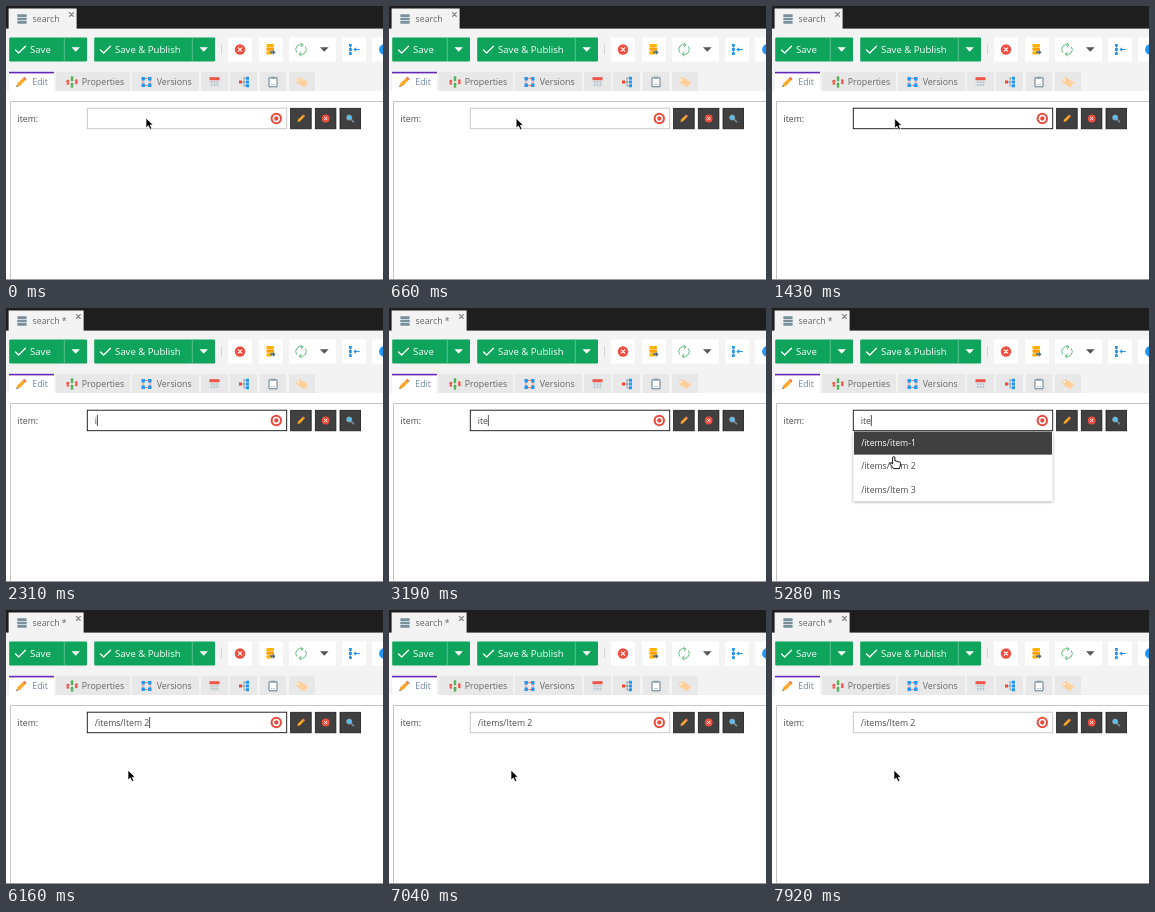
Animation, 377 px wide and 274 px high, one loop 8 s. Source, as an HTML page:

```html
<!DOCTYPE html>
<html lang="en">
<head>
<meta charset="utf-8">
<title>Item search</title>
<style>
html, body { margin: 0; width: 100%; height: 100%; overflow: hidden; background: #fff; }
svg { display: block; width: 377px; height: 274px; }
text { font: 8.7px "Open Sans", sans-serif; fill: #4a4a4a; white-space: pre; }
text.btn { font-size: 9.6px; fill: #fff; }
text.tab { font-size: 8.8px; fill: #666; }
text.tab.on { fill: #6f87a6; }
.line { fill: none; stroke-linecap: round; stroke-linejoin: round; }
</style>
</head>
<body>
<svg id="stage" viewBox="0 0 377 274">
  <defs>
    <filter id="shadow" x="-10%" y="-10%" width="120%" height="130%">
      <feDropShadow dx="0" dy="1" stdDeviation="1.6" flood-color="#000" flood-opacity=".4"/>
    </filter>
    <g id="pencil">
      <path d="M-5 5l1.2-3.8L3-5.2 5.2-3-1.2 3.8z" fill="#ffa726"/>
      <path d="M1.8-4L3-5.2 5.2-3 4-1.8z" fill="#e57373"/>
      <path d="M-5 5l.5-1.7 1.2 1.2z" fill="#455a64"/>
    </g>
    <g id="cancel">
      <circle r="5.2" fill="#ee4f40"/>
      <path class="line" d="M-1.7-1.7L1.7 1.7M1.7-1.7L-1.7 1.7" stroke="#fff" stroke-width="1.2"/>
    </g>
    <g id="tree">
      <path class="line" d="M-2 0H2M0-4V4H2M0-4H2" stroke="#78909c" stroke-width=".8"/>
      <path d="M-5-1.5h3v3h-3z" fill="#f44336"/>
      <path d="M2-5.3h3v3H2zM2-1.5h3v3H2zM2 2.3h3v3H2z" fill="#2196f3"/>
    </g>
  </defs>

  <rect width="377" height="274" fill="#fff"/>
  <rect width="377" height="23" fill="#1e1e1e"/>
  <rect y="22.6" width="377" height="62.4" fill="#f3f3f3"/>
  <rect id="tab" x="2.6" y="2.5" height="21" fill="#f3f3f3"/>
  <g fill="#78909c">
    <rect x="11.3" y="8.3" width="9.4" height="2.6" rx=".6"/>
    <rect x="11.3" y="11.7" width="9.4" height="2.6" rx=".6"/>
    <rect x="11.3" y="15.1" width="9.4" height="2.6" rx=".6"/>
  </g>
  <text id="title" class="tab" x="26.5" y="16.3"></text>
  <path id="close" class="line" d="M-2-2L2 2M2-2L-2 2" stroke="#888" stroke-width="1.1"/>

  <g id="buttons"></g>
  <path d="M215.5 38.5v10" stroke="#ccc" stroke-width=".8"/>
  <g fill="#fff">
    <rect x="222" y="31.4" width="24" height="24.2"/><rect x="253" y="31.4" width="24" height="24.2"/>
    <rect x="283" y="31.4" width="47" height="24.2"/><rect x="336" y="31.4" width="24" height="24.2"/>
    <rect x="366" y="31.4" width="11" height="24.2"/>
  </g>
  <use href="#cancel" x="234" y="43.5"/>
  <g transform="translate(264.6 43.3)">
    <rect x="-4.2" y="-5.3" width="7.6" height="3.2" rx="1" fill="#ffb300"/>
    <rect x="-4.2" y="-1.7" width="7.6" height="3.2" rx="1" fill="#ffa000"/>
    <rect x="-4.2" y="1.9" width="5.6" height="3.2" rx="1" fill="#ffb300"/>
    <path d="M-.4 2h2.6V.4L5 3 2.2 5.6V4H-.4z" fill="#546e7a"/>
  </g>
  <g class="line" stroke="#5fbf77" stroke-width="1">
    <path d="M290.5 46.2A5 5 0 0 1 296.5 38.8M299.5 40.8A5 5 0 0 1 293.5 48.2"/>
    <path d="M294.9 37.2l2 1.6-1.6 2M295.1 46.2l-1.8 2 2 1.7"/>
  </g>
  <path d="M314 41.2h8.6l-4.3 4.6z" fill="#555"/>
  <path d="M344.5 38.5v10" stroke="#78909c" stroke-width=".8"/>
  <path d="M343 37.9h2.8v2.8H343zM343 42.1h2.8v2.8H343zM343 46.3h2.8v2.8H343z" fill="#2196f3"/>
  <path d="M347.3 43.5l2.8-2.2v1.6h3.6v1.2h-3.6v1.6z" fill="#2196f3"/>
  <circle cx="378.4" cy="43.5" r="5.3" fill="#2196f3"/>

  <g id="tabs"></g>
  <use href="#pencil" x="15.3" y="76"/>
  <g id="people"></g>
  <g transform="translate(140.5 76)">
    <path d="M-3.5-3.5h7v7h-7z" fill="none" stroke="#ef6c60" stroke-width=".8"/>
    <path d="M-5-5h3.4v3.4H-5zM1.6-5H5v3.4H1.6zM-5 1.6h3.4V5H-5zM1.6 1.6H5V5H1.6z" fill="#2196f3"/>
  </g>
  <g transform="translate(208.5 76)">
    <path d="M-5-4.6H5V5H-5z" fill="#dde3e6"/>
    <path d="M-5-4.8H5v3H-5z" fill="#ee5548"/>
    <path d="M-3.5 .2H3.6M-3.5 2.8H3.6" stroke="#a3b1b8" stroke-width="1.2" stroke-dasharray="1.4 1.4"/>
  </g>
  <use href="#tree" x="238" y="76"/>
  <g transform="translate(267 76)">
    <path d="M-4-4.2h8v9h-8z" fill="#fff" stroke="#607d8b"/>
    <path d="M-2-5.4h4v2.2h-4z" fill="#90a4ae"/>
    <path d="M-1.8 2.6H2" stroke="#90a4ae" stroke-dasharray="1.2 1.2"/>
  </g>
  <g transform="translate(296 76)">
    <path d="M-6-2.8L-2.2-4.8 6 .3 2.3 5.2-5 1z" fill="#ffd09b"/>
    <circle cx="-3.8" cy="-2" r=".9" fill="#fff"/>
  </g>

  <path d="M4.5 274V95.5H377" fill="none" stroke="#c4c4c4"/>
  <path d="M0 273.5H377" stroke="#9a9a9a"/>
  <text x="11.5" y="116.2">item:</text>

  <rect id="field" x="81.3" y="102.2" width="199.4" height="20.5" fill="#fff"/>
  <text id="value" x="88.8" y="116.2"></text>
  <path id="caret" d="M0 107v11" stroke="#222" stroke-width=".8"/>
  <circle cx="270.3" cy="112.5" r="5.7" fill="#ea4b3c"/>
  <circle cx="270.3" cy="112.5" r="2.9" fill="none" stroke="#fff" stroke-width="1.5"/>
  <g fill="#404040" stroke="#1c1c1c" stroke-width=".8">
    <rect x="284.6" y="102.3" width="20.6" height="20.5"/>
    <rect x="309.3" y="102.3" width="20.6" height="20.5"/>
    <rect x="334" y="102.3" width="20.6" height="20.5"/>
  </g>
  <use href="#pencil" transform="translate(295 112.5) scale(.75)"/>
  <use href="#cancel" transform="translate(319.7 112.5) scale(.75)"/>
  <g transform="translate(344 112.3)">
    <path d="M1 1L4 4" stroke="#78909c" stroke-width="1.6"/>
    <circle cx="-.8" cy="-.8" r="2.5" fill="#4fc3f7" stroke="#90a4ae"/>
  </g>

  <g id="loading">
    <rect x="81.5" y="124" width="199.5" height="45" fill="#f6f6f6" filter="url(#shadow)"/>
    <rect x="154.5" y="125" width="52.3" height="42" fill="#d0d0d0"/>
    <g id="spinner"></g>
    <text x="161.4" y="157.5">Loading...</text>
  </g>
  <g id="list">
    <rect x="81.5" y="123.5" width="199" height="69.5" fill="#fff" filter="url(#shadow)"/>
  </g>

  <path id="arrow" d="M0 0V9.8L2.3 7.7 4 11.4 5.8 10.6 4.2 7H7.2z" fill="#000" stroke="#fff" stroke-width=".7"/>
  <path id="hand" d="M-1.2 .2Q0-1 1.1 .2V4Q2.2 3.3 3 4.4 4.3 3.8 5 5 6.8 4.7 6.8 6.3 6.8 9 5.5 11.6H-.3Q-1.6 9.3-3.9 7.2-4.2 5.5-2.6 5.8L-1.2 7z" fill="#fff" stroke="#000" stroke-width=".9"/>
</svg>
<script>
const LOOP = 8000;
const $ = id => document.getElementById(id);

function add(parent, tag, attrs, text) {
  const el = document.createElementNS("http://www.w3.org/2000/svg", tag);
  for (const k in attrs) el.setAttribute(k, attrs[k]);
  if (text) el.textContent = text;
  parent.append(el);
  return el;
}
const set = (id, attrs) => { for (const k in attrs) $(id).setAttribute(k, attrs[k]); };
const show = (id, on) => set(id, { visibility: on ? "visible" : "hidden" });

// Green split buttons: left, divider, right, label
for (const [x, mid, end, label] of [[3, 58, 81, "Save"], [88, 186, 209, "Save & Publish"]]) {
  const g = $("buttons");
  add(g, "rect", { x: x + .2, y: 31.4, width: end - x - .2, height: 24.2, rx: 1, fill: "#0fa45c" });
  add(g, "path", { d: `M${mid + .3} 31.4v24.2`, stroke: "#6ccb9c", "stroke-width": .8 });
  add(g, "path", { d: `M${x + 6.5} 44l3.2 3 6.8-6.8`, class: "line", stroke: "#fff", "stroke-width": 1.3 });
  add(g, "path", { d: `M${mid + 7.5} 41.2h8.4l-4.2 4.6z`, fill: "#fff" });
  add(g, "text", { x: x + 21, y: 47, class: "btn" }, label);
}

// Tab strip: left, right, label, label left
const tabs = [[3, 48, "Edit", 26.3], [50, 124, "Properties", 75.8], [126, 193, "Versions", 150.8],
  [195, 222], [224, 251], [254, 280], [283, 309]];
tabs.forEach(([x, end, label, tx], i) => {
  const g = $("tabs");
  add(g, "rect", { x, y: 66, width: end - x, height: 19, fill: i ? "#e8e8e8" : "#fff" });
  if (!i) add(g, "rect", { x, y: 65.8, width: end - x, height: 1.6, fill: "#6428b4" });
  if (label) add(g, "text", { x: tx, y: 79.3, class: i ? "tab" : "tab on" }, label);
});

for (const [x, y, color] of [[61.8, 76, "#f0564a"], [66, 72.5, "#4caf50"], [66, 79, "#4caf50"], [70.3, 75.5, "#f0564a"]]) {
  add($("people"), "circle", { cx: x, cy: y - .8, r: 1.4, fill: color });
  add($("people"), "rect", { x: x - 1.2, y: y + .4, width: 2.4, height: 2.2, fill: color });
}

for (let i = 0; i < 8; i++)
  add($("spinner"), "path", { d: "M0-2.2V-4.2", class: "line", stroke: "#555", "stroke-width": 1.1,
    opacity: (i / 7) ** 2, transform: `rotate(${i * 45})` });

const rows = ["/items/item-1", "/items/Item 2", "/items/Item 3"].map((label, i) => {
  const y = 123.5 + i * 23.3;
  return {
    bar: add($("list"), "rect", { x: 82, y, width: 198, height: 23.3 }),
    text: add($("list"), "text", { x: 89.2, y: y + 14.4 }, label)
  };
});

// Hard changes, in ms
const FOCUS = 880, TYPE = [2310, 2640, 2970], LOAD = 3740, LIST = 4730, HAND = 4950,
  HOVER = 5390, PICK = 5720, BLUR = 6930, BLINK = 1100;

// Pointer stops: time, x, y
const path = [[0, 140, 112], [220, 140, 112], [880, 122.7, 112.4], [4950, 122.7, 114],
  [5170, 121.8, 149], [5280, 121.8, 149], [5500, 122, 160.2], [LOOP, 122, 160.2]];

function pointer(t) {
  const n = path.findIndex(p => p[0] > t);
  const [t0, x0, y0] = path[n - 1], [t1, x1, y1] = path[n];
  const u = (t - t0) / (t1 - t0), e = u * u * (3 - 2 * u);
  return `translate(${x0 + (x1 - x0) * e} ${y0 + (y1 - y0) * e})`;
}

function render(t) {
  const dirty = t >= TYPE[0], picked = t >= PICK;
  const focused = t >= FOCUS && t < BLUR;
  const value = picked ? "/items/Item 2" : "ite".slice(0, TYPE.filter(k => t >= k).length);

  $("title").textContent = dirty ? "search *" : "search";
  set("tab", { width: dirty ? 75 : 68 });
  set("close", { transform: `translate(${dirty ? 72.4 : 65.4} 8.5)` });

  set("field", { stroke: focused ? "#111" : "#c4c4c4", "stroke-width": .9 });
  $("value").textContent = value;
  const width = value ? $("value").getComputedTextLength() : 0;
  set("caret", { transform: `translate(${89.2 + width} 0)` });
  const last = [FOCUS, ...TYPE, PICK].filter(k => t >= k).pop();
  show("caret", focused && (t - last) % BLINK < BLINK / 2);

  show("loading", t >= LOAD && t < LIST);
  set("spinner", { transform: `translate(181 138) rotate(${Math.floor(t / 110) * 45})` });

  show("list", t >= LIST && !picked);
  const active = t < HOVER ? 0 : 1;
  rows.forEach(({ bar, text }, i) => {
    bar.setAttribute("fill", i === active ? "#404040" : "#fff");
    text.style.fill = i === active ? "#fff" : "#4a4a4a";
  });

  const at = pointer(t), hand = t >= HAND && !picked;
  set("arrow", { transform: at });
  set("hand", { transform: at });
  show("hand", hand);
  show("arrow", !hand && (!dirty || picked));
}

function tick(now) {
  render(now % LOOP);
  requestAnimationFrame(tick);
}
render(0);
requestAnimationFrame(tick);
</script>
</body>
</html>
```
